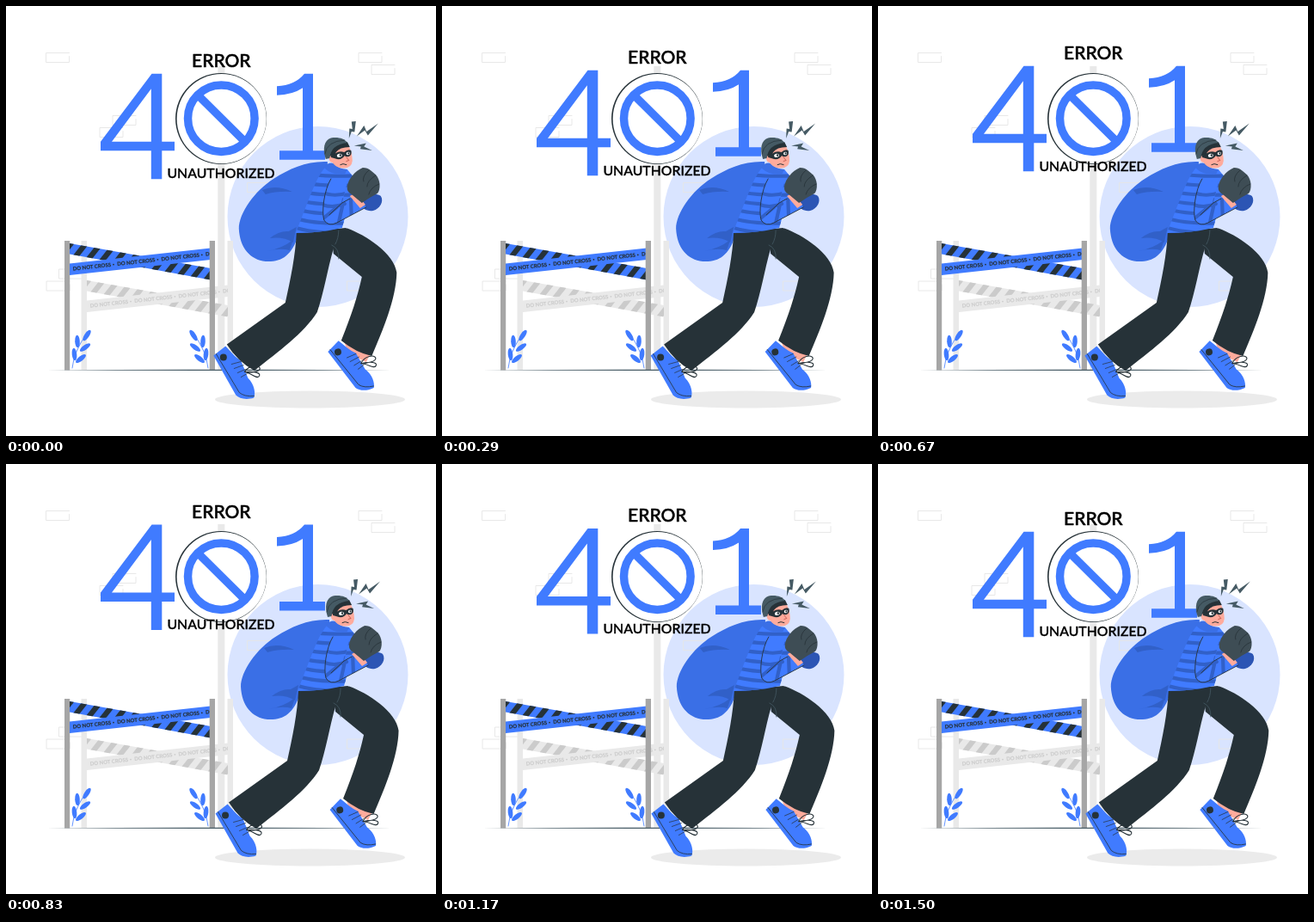
An HTML page with a canvas that plays this animation: 500 by 500 pixels, repeating every 1.54 s.

```html
<!DOCTYPE html>
<html lang="en">
<head>
<meta charset="utf-8">
<title>Error 401</title>
<style>
  html, body { margin: 0; width: 100%; height: 100%; overflow: hidden; background: #fff; }
  canvas { display: block; width: 500px; height: 500px; }
</style>
</head>
<body>
<canvas id="stage" width="500" height="500"></canvas>
<script>
const ctx = document.getElementById('stage').getContext('2d');

const LOOP = 1540, FPS = 24, CYCLE = 1500, PHASE = 0.02;
const BLUE = '#407bff', BAG = '#3a6fe6', DEEP = '#3160c8', DARK = '#263238';
const SLATE = '#455a64', GLOVE = '#3e4d55', PALE = '#e9e9e9', SKIN = '#ffab9c';
const SHAKE = [0, -1, 2, -4, 4, -4, 4, -4, 2, -1, 0];

const fill = (color, d, rule) => {
  ctx.fillStyle = color;
  ctx.fill(new Path2D(d), rule || 'nonzero');
};

const line = (color, width, d) => {
  ctx.strokeStyle = color;
  ctx.lineWidth = width;
  ctx.stroke(new Path2D(d));
};

const rect = (color, x, y, w, h) => {
  ctx.fillStyle = color;
  ctx.fillRect(x, y, w, h);
};

const ellipse = (color, x, y, rx, ry = rx, angle = 0) => {
  ctx.fillStyle = color;
  ctx.beginPath();
  ctx.ellipse(x, y, rx, ry, angle, 0, Math.PI * 2);
  ctx.fill();
};

const label = (text, x, y, font, color, align, weight = 0.2) => {
  ctx.font = font + ' Lato, "Open Sans", sans-serif';
  ctx.fillStyle = ctx.strokeStyle = color;
  ctx.textAlign = align;
  ctx.lineWidth = weight;
  ctx.fillText(text, x, y);
  ctx.strokeText(text, x, y);
};

const moved = (x, y, draw, angle = 0) => {
  ctx.save();
  ctx.translate(x, y);
  ctx.rotate(angle);
  draw();
  ctx.restore();
};

function clipped(d, draw) {
  ctx.save();
  ctx.clip(new Path2D(d));
  draw();
  ctx.restore();
}

function bricks() {
  const spots = [[46.5, 54.5], [410, 54.5], [425, 68.5], [109, 141.5], [124, 127.5],
    [280.5, 205.5], [47, 320], [61.5, 306], [396.5, 320]];
  for (const [x, y] of spots) line('#e6e6e6', 0.9, `M${x + 27} ${y}H${x}V${y + 11}H${x + 27}V${y + 4}`);
}

function tapes(base, stripe, ink) {
  const band = 'M74 276L238 305V318.5L74 288.5Z';
  fill(base, band);
  clipped(band, () => {
    for (let x = 74; x < 260; x += 15.2) {
      const y = 276 + (x - 74) * 0.178;
      fill(stripe, `M${x} ${y - 3}h8l-15 19h-8Z`);
    }
  });
  const front = 'M74 299.5L238 281.5V295L74 313Z';
  fill(base, front);
  clipped(front, () => moved(78, 307.7, () => {
    for (let i = 0; i < 4; i++) {
      label('DO NOT CROSS', i * 51.7, 0, 'bold 6px', ink, 'left');
      ellipse(ink, i * 51.7 + 47.5, -2, 0.9);
    }
  }, -0.109));
}

function barrier() {
  rect(PALE, 87.5, 273, 6.5, 150);
  rect(PALE, 257.5, 273, 6.5, 150);
  moved(20, 43, () => tapes(PALE, '#cbcbcb', '#cdcdcd'));
  rect('#a6a6a6', 68, 273, 6.2, 150.5);
  tapes(BLUE, DARK, DARK);
  rect('#a6a6a6', 236.7, 273, 6.3, 150.5);
}

function plant(x, flip) {
  ctx.save();
  ctx.translate(x, 421);
  ctx.scale(flip, 1);
  line(BLUE, 0.8, 'M0 0Q2 -20 17 -40');
  const leaves = [[17, -38, 0.6], [6, -31, -0.05], [15, -24, 0.95],
    [2.5, -16, -0.1], [10, -11, 0.9]];
  for (const [lx, ly, a] of leaves) ellipse(BLUE, lx, ly, 2.8, 7.3, a);
  ctx.restore();
}

function sign() {
  ellipse(DARK, 250, 131, 53);
  ellipse('#fff', 250.7, 131.2, 52.1);
  ctx.strokeStyle = BLUE;
  ctx.lineWidth = 9.5;
  ctx.beginPath();
  ctx.arc(250.3, 130.7, 38.8, 0, Math.PI * 2);
  ctx.moveTo(223, 103.5);
  ctx.lineTo(278, 158);
  ctx.stroke();
}

function headline() {
  label('ERROR', 250.3, 70.5, '500 21px', '#000', 'center', 0.5);
  label('UNAUTHORIZED', 250, 200.2, '500 15.8px', '#000', 'center', 0.4);
  fill(BLUE, 'M110 157.5L169.5 78.5H181.3V157.5H196V168H181.3V201H168.8V168H110Z'
    + 'M123 157.5H168.8V96Z', 'evenodd');
  fill(BLUE, 'M315 93Q336 92 347 78.5H357V168H371V178.5H318V168H345V95Q333 103 315 103.5Z');
}

function shoe() {
  fill(BLUE, 'M0 0L14 -11C20 -5 25 2 32 6L40 26C48 34 49 44 47 49C38 52 30 50 26 46Z');
  line(DARK, 0.8, 'M3 -2L30 43Q36 48 47 47');
  line(DARK, 0.7, 'M21 10L32 7M24 15L35 11M28 20L37 16M32 25L39 21');
  ellipse(DARK, 11.5, 2, 4);
  line(DARK, 1.1, 'M36 19C42 10 53 11 54 15C54 19 43 20 36 19C44 20 50 28 53 24C56 20 47 18 36 19');
}

function legs() {
  fill(SKIN, 'M392 386L425 402L419 414L398 404Z');
  moved(241.5, 406.5, shoe);
  moved(374.5, 402, shoe, -0.14);
  fill(DARK, 'M378 260L397 258.5C418 266 452 288 454.5 310C454 340 438 378 425.5 407'
    + 'Q407 403 390 389C402 359 409 338 414 315L381 288Z');
  fill(DARK, 'M338 263C337 289 331 318 325 345L257 393.5Q270 414 289 424'
    + 'C318 401 346 381 362 356C370 333 374 306 381 282L396 258Z');
  line(SLATE, 0.8, 'M379 278Q388 282 387 294M387 261Q387 270 383 277');
}

function bag() {
  fill(BAG, 'M374 181C350 180 330 189 312 200.5C289 215 271 241 271 259'
    + 'C272 281 284 295 302 297C320 298 332 291 340 267L375 210Z');
  fill(DEEP, 'M298 214Q314 207 333 216Q315 215 302 219Z');
  fill(DEEP, 'M307 270Q318 261 329 262L338 257L334 275Q323 268 307 270Z');
  fill(DEEP, 'M304 285Q321 282 334 272L330 284Q319 281 304 285Z');
}

function sweater() {
  const torso = 'M371 188C361 199 354 221 337 264Q365 264 391 258L396 240L410 206L397 190Z';
  fill(BLUE, torso);
  clipped(torso, () => {
    for (let i = 0; i < 7; i++) {
      const y = 195 + i * 11;
      line(DEEP, 4.2, `M335 ${y - 4}Q360 ${y + 5} 412 ${y + 2}`);
    }
  });
  fill('#2c55b4', 'M414 229C417 221 429 216 436 221C440 227 435 236 427 238C420 239 414 236 414 229Z');
  const sleeve = 'M378 201C370 214 367 239 370 249Q375 257 385 252L419 234L410 218L391 229L397 205Z';
  fill(BLUE, sleeve);
  clipped(sleeve, () => {
    line(DEEP, 4.2, 'M367 216Q380 223 399 217M366 230Q379 236 394 230M368 248L385 234M386 257L393 225M402 247L401 220');
  });
  line(DARK, 0.9, 'M378 201C370 214 367 239 370 249Q375 257 385 252L419 234M376 243L391 229L400 224');
  fill(SKIN, 'M400 221L407 217L418 231L412 235Z');
  fill(GLOVE, 'M397 210C398 201 406 192 415 188C423 188 426 193 430 196'
    + 'C436 202 436 214 432 218L423 223L414 229L402 219Q396 216 397 210Z');
  line(DARK, 0.8, 'M422 191Q414 198 416 204M430 197Q420 203 420 210'
    + 'M434 207Q424 211 422 219');
}

function head() {
  fill(BAG, 'M370 188Q375 181 381 183Q388 190 397 190L394 196Q379 197 370 188Z');
  fill(SKIN, 'M376 172L398 161Q403 171 403 180Q402 189 392 188.5Q379 188 376 172Z');
  fill(DARK, 'M375 176Q376 161 397 158L400 164Q388 164 384 170L380 178Z');
  ellipse(SKIN, 379, 178, 3, 3.8, -0.3);
  fill(DARK, 'M378 174L383 171.5Q388 168 393.5 170Q398 166 401.5 168Q403 173 399 175'
    + 'Q395.5 176 394 174Q391 179 385 178Q382 177 378 176Z');
  ellipse('#fff', 388, 173.8, 3, 2, -0.2);
  ellipse('#fff', 398, 171.5, 2.1, 1.8, -0.2);
  ellipse(DARK, 389, 173.5, 1.2);
  ellipse(DARK, 398.5, 171.4, 1.1);
  line('#b84e45', 0.8, 'M396 176L399 179.5L396 180.5');
  line(DARK, 1, 'M389 184.5Q392 182.5 396 184.5');
  fill(SLATE, 'M372 178C368 166 370 156 378 153.5C386 152 394 154 397 159Q378 161 376.5 177Z');
  line(DARK, 0.7, 'M371 172Q373 157 394 156');
}

function alarmMarks() {
  fill(SLATE, 'M402 134.5L407 134L405.5 146.5L402 146L399 154L399.5 142.5L403 143Z');
  fill(SLATE, 'M408 151.5L416.5 139L419.5 146L433 136.5L421 150.5L417.5 144.5Z');
  fill(SLATE, 'M405 162.5L419 159.5L416.5 163.5L426 168L412 166.3L413 163.5Z');
}

function shakeAt(p) {
  const i = Math.floor(p * 10);
  return SHAKE[i] + (SHAKE[i + 1] - SHAKE[i]) * (p * 10 - i);
}

function render(now) {
  const step = Math.min(36, Math.floor(((now % LOOP) + 4) * FPS / 1000));
  const p = (step * 1000 / FPS / CYCLE + PHASE) % 1;
  const lift = 0.6 - 10 * (1 - Math.abs(1 - 2 * p));

  rect('#fff', 0, 0, 500, 500);
  ellipse('#d9e4ff', 362.5, 245, 105);
  bricks();
  ellipse('#ebebeb', 353.5, 457.5, 110.5, 10);
  rect(PALE, 246.3, 70, 8, 353);
  barrier();
  plant(77, 1);
  plant(235, -1);
  fill(SLATE, 'M47 423.3Q150 422.5 248 422.7Q350 422.5 448 423.3Q350 424 248 423.9Q150 424 47 423.3Z');
  sign();
  moved(0, lift, headline);
  moved(shakeAt(p), 0, () => {
    bag();
    legs();
    sweater();
    head();
    alarmMarks();
  });
}

ctx.lineCap = ctx.lineJoin = 'round';
const start = performance.now();
function tick() {
  render(performance.now() - start);
  requestAnimationFrame(tick);
}
tick();
</script>
</body>
</html>
```
